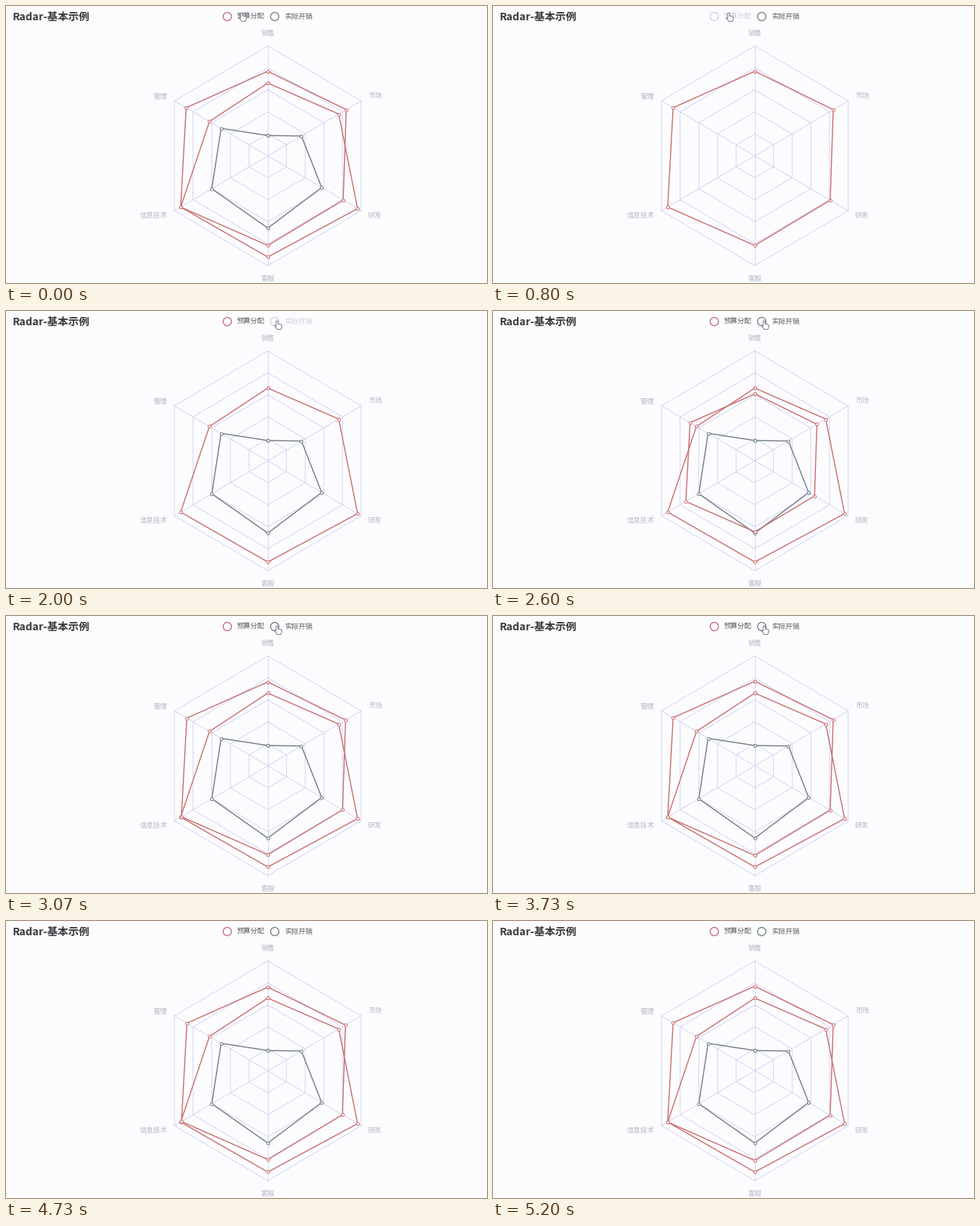
A matplotlib script for the animation above (5.27 s loop, 639 px wide and 368 px high).

```python
import numpy as np
import matplotlib.pyplot as plt
from matplotlib.animation import FuncAnimation
from matplotlib.patches import Circle, PathPatch
from matplotlib.path import Path

W, H, DPI = 639, 368, 64
PX = 72 / DPI  # one pixel in points
FRAMES, INTERVAL = 310, 17
STEP = 200 / 3  # the motion advances at 15 steps per second
GROW = 1000

BG = "#fcfcfe"
GRID = "#d2d2f3"
LABEL = "#b9b9ca"
OFF = "#d0d0de"
INK = "#5f5f64"
RED = "#c96d6f"
SLATE = "#707e82"
PINK = "#c86488"

CENTER = np.array([347.8, 199.0])
RX, RY = 143.2, 146.0
ANGLE = np.radians(90 + 60 * np.arange(6))
UNIT = np.column_stack([RX * np.cos(ANGLE), -RY * np.sin(ANGLE)])
LIMITS = np.array([6500, 16000, 30000, 38000, 52000, 25000])

plt.rcParams["font.family"] = "Noto Sans CJK JP"
fig = plt.figure(figsize=(W / DPI, H / DPI), dpi=DPI, facecolor=BG)
ax = fig.add_axes([0, 0, 1, 1])
ax.set_xlim(0, W)
ax.set_ylim(H, 0)
ax.axis("off")


def closed(pts):
    return np.vstack([pts, pts[:1]])


def label(x, y, text, size=9.3, color=LABEL, ha="left", **kw):
    """Text whose em box is centred on y."""
    return ax.text(x, y + 0.38 * size, text, fontsize=size * PX, color=color,
                   ha=ha, va="baseline", zorder=2, **kw)


def draw_grid():
    style = dict(color=GRID, lw=0.9 * PX, zorder=1)
    for k in range(1, 6):
        ax.plot(*closed(CENTER + UNIT * k / 5).T, **style)
    for tip in CENTER + UNIT:
        ax.plot(*np.column_stack([CENTER, tip]), **style)


class Series:
    def __init__(self, values, color, zorder):
        self.pts = UNIT * (np.array(values) / LIMITS)[:, None]
        self.line, = ax.plot([], [], color=color, lw=1.4 * PX, marker="o",
                             ms=3.8 * PX, mfc="white", mec=color,
                             mew=1.0 * PX, zorder=zorder)

    def draw(self, scale):
        self.line.set_visible(scale is not None)
        if scale is not None:
            self.line.set_data(*closed(CENTER + self.pts * scale).T)


class LegendItem:
    """A legend entry that hides and regrows its series."""

    def __init__(self, x, text, color, series, toggles):
        self.ring = ax.add_patch(Circle((x, 14), 5.5, fc="white", ec=color,
                                        lw=1.3 * PX, zorder=3))
        self.text = label(x + 13, 13.6, text, color=INK)
        self.color, self.series, self.toggles = color, series, toggles

    def scale(self, step):
        value = 1.0
        for off, on in self.toggles:
            if off <= step < on:
                return None
            if step >= on:
                p = (step - on) * STEP / GROW
                value = 1.0 if p >= 1 else 1 - 2 ** (-10 * p)
        return value

    def draw(self, step):
        s = self.scale(step)
        self.ring.set_edgecolor(OFF if s is None else self.color)
        self.text.set_color(OFF if s is None else INK)
        for item in self.series:
            item.draw(s)


# Pointing hand, tip at the origin
HAND = np.array([[0, 0], [1.3, 0.6], [1.5, 4.2], [5.6, 5.2], [6.8, 6.6],
                 [6.4, 9.6], [5.2, 12], [0.4, 12], [-3.2, 7.6], [-2.6, 6.5],
                 [-1.2, 7.3], [-1.2, 0.6]])
# Step, x and y of the pointer tip
TRACK = np.array([[0, 313, 9], [14, 313, 9], [19, 360, 12],
                  [30, 360, 13], [62, 360, 13], [66, 308, 10],
                  [69, 306, 10]])


def place_hand(step):
    hand.set_visible(step < TRACK[-1, 0])
    tip = [np.interp(step, TRACK[:, 0], TRACK[:, k]) for k in (1, 2)]
    hand.set_path(Path(closed(HAND * 0.95 + tip), closed=True))


draw_grid()
label(9, 13.8, "Radar-基本示例", 14, "#3a3a3e", weight="bold")
for x, y, name, ha in [(347.5, 35.5, "销售", "center"),
                       (214.5, 119, "管理", "right"),
                       (214.5, 277.5, "信息技术", "right"),
                       (347.5, 361, "客服", "center"),
                       (481, 277.5, "研发", "left"),
                       (481, 118.5, "市场", "left")]:
    label(x, y, name, ha=ha)

budget = Series([4300, 10000, 28000, 35000, 50000, 19000], RED, 4)
base = Series([1200, 8000, 18000, 25000, 30000, 9000], SLATE, 5)
actual = Series([5000, 14000, 28000, 31000, 42000, 21000], RED, 6)

items = [LegendItem(294, "预算分配", PINK, [budget, base], [(6, 14.3)]),
         LegendItem(357, "实际开销", SLATE, [actual],
                    [(26, 35.6), (57, 61)])]
hand = ax.add_patch(PathPatch(Path(closed(HAND)), fc="white", ec="#6a6a78",
                              lw=0.9 * PX, joinstyle="round", zorder=9))


def update(i):
    step = int((i + 1) * INTERVAL / STEP + 0.05)
    for item in items:
        item.draw(step)
    place_hand(step)
    return []


anim = FuncAnimation(fig, update, frames=FRAMES, interval=INTERVAL,
                     init_func=lambda: update(0), repeat=True,
                     repeat_delay=0, blit=False)
plt.show()
```
